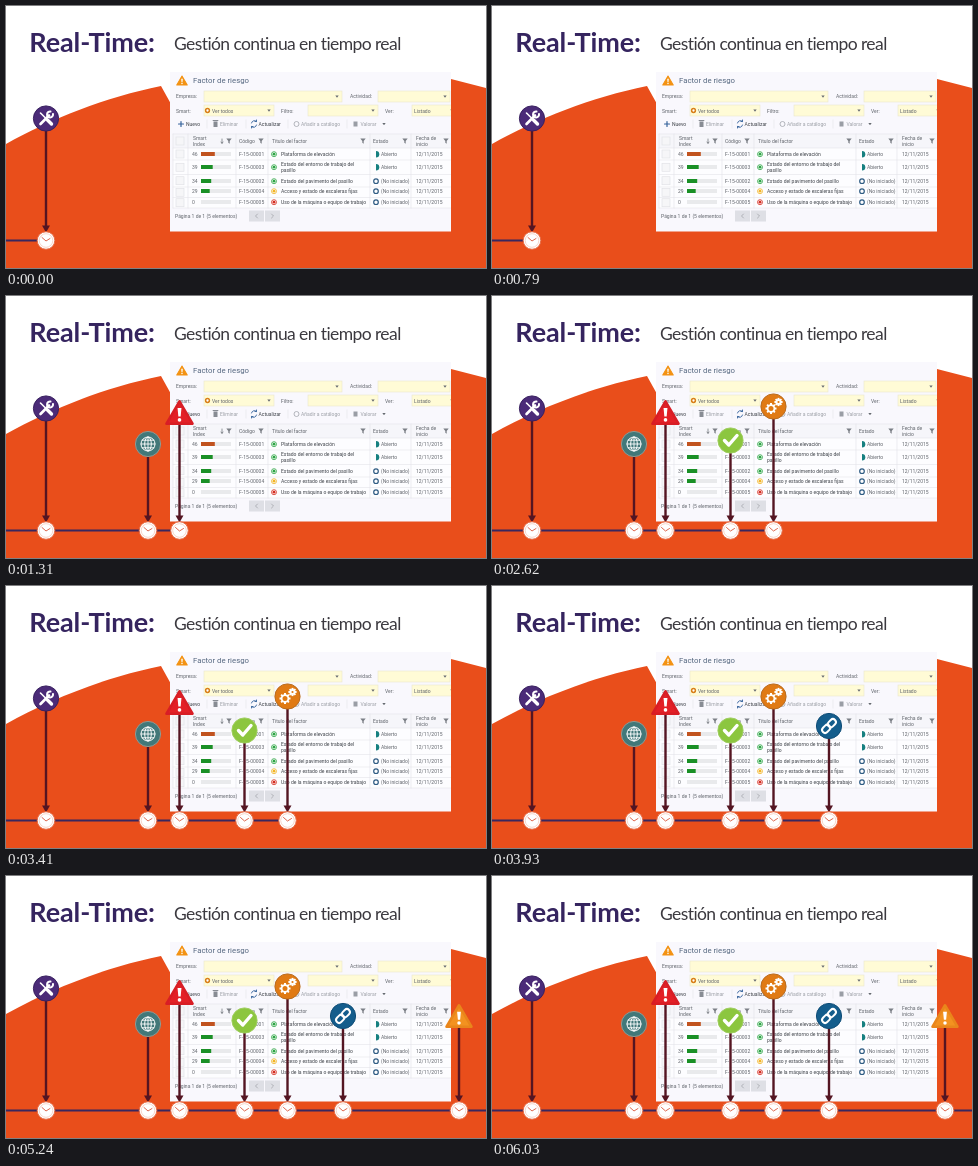
These frames come from a looping animation (480x262 px, 6.55 s). An HTML page:

```html
<!DOCTYPE html>
<html lang="es">
<head>
<meta charset="utf-8">
<title>Real-Time</title>
<style>
html, body { margin: 0; width: 100%; height: 100%; overflow: hidden; background: #fff; }
svg { display: block; width: 100vw; height: 100vh; }
text { font-family: Roboto, Arial, sans-serif; font-size: 5px; fill: #5f636a; }
.title { font: 700 27px Lato, sans-serif; letter-spacing: -.1px; fill: #35245f; }
.subtitle { font: 400 17.5px Lato, sans-serif; letter-spacing: -.59px; fill: #3b393f; }
.heading { font-size: 7.8px; fill: #566880; }
.dim { fill: #9b9ea5; }
.strong { fill: #3c4047; }
</style>
</head>
<body>
<svg id="stage" viewBox="0 0 480 262">
  <rect width="480" height="262" fill="#fff"/>
  <path fill="#e94e1b" d="M0 138C45 113 100 91 155 80L165 98H445V73L480 82V262H0Z"/>
  <text class="title" x="23.3" y="46">Real-Time:</text>
  <text class="subtitle" x="168" y="44">Gestión continua en tiempo real</text>
  <svg id="panel" x="164" y="66" width="281" height="159.5" viewBox="164 66 281 159.5"></svg>
  <line id="track" y1="234.5" y2="234.5" stroke="#38275f" stroke-width="2.2"/>
  <g id="pins"></g>
</svg>
<script>
const STEP = 1310;
const $ = id => document.getElementById(id);

const rect = (x, y, w, h, fill, extra = '') =>
  `<rect x="${x}" y="${y}" width="${w}" height="${h}" fill="${fill}" ${extra}/>`;
const circle = (x, y, r, fill, extra = '') =>
  `<circle cx="${x}" cy="${y}" r="${r}" fill="${fill}" ${extra}/>`;
const stroke = (d, color, width = 1) =>
  `<path d="${d}" fill="none" stroke="${color}" stroke-width="${width}" stroke-linecap="round" stroke-linejoin="round"/>`;
const label = (x, y, text, cls = '') => `<text x="${x}" y="${y}" class="${cls}">${text}</text>`;
const arrow = (x, y) => `<path d="M${x - 1.7} ${y - 1}h3.4l-1.7 2.2z" fill="#666a70"/>`;
const funnel = (x, y) => `<path d="M${x - 2.7} ${y - 2.5}h5.4l-2 2.6v2.6l-1.4-1v-1.6z" fill="#7b7f86"/>`;
const field = (x, y, w) => rect(x, y, w, 11, '#fffbd6', 'stroke="#e9e6cd" stroke-width=".6"') + arrow(x + w - 5, y + 5.5);
const checkbox = y => rect(170, y - 4, 8, 8, '#f6f6f8', 'stroke="#dedfe3" stroke-width=".6"');

function warning(size, color, edge = color) {
  const h = size * .86;
  return `<path d="M0 ${-h / 2}L${size / 2} ${h / 2}H${-size / 2}Z" fill="${color}" stroke="${edge}" stroke-width="${size * .1}" stroke-linejoin="round"/>` +
    `<path d="M${-size * .075} ${-h * .2}h${size * .15}l${-size * .03} ${h * .38}h${-size * .09}z" fill="#fff"/>` +
    circle(0, h * .33, size * .07, '#fff');
}

function toolbar() {
  return stroke('M172.5 118h5M175 115.5v5', '#35639b', 1.2) + label(180, 120, 'Nuevo', 'strong') +
    rect(207.5, 115.5, 4, 5.5, '#888c94') + rect(206.7, 114, 5.6, 1, '#888c94') + label(214, 120, 'Eliminar', 'dim') +
    stroke('M245.5 117a3 3 0 0 1 5-1.5M250.5 119a3 3 0 0 1-5 1.5M250.5 114v1.5h-1.5M245.5 122v-1.5h1.5', '#35639b', .9) +
    label(252.5, 120, 'Actualizar', 'strong') +
    circle(290.5, 118, 2.5, 'none', 'stroke="#a2a5ad" stroke-width=".8"') + label(295, 120, 'Añadir a catálogo', 'dim') +
    rect(347.5, 115.5, 4, 5, '#9a9da5') + label(354.5, 120, 'Valorar', 'dim') + arrow(378, 118) +
    stroke('M201 114v8M240 114v8M282 114v8M341 114v8', '#e3e4e9', .6);
}

function tableRow([y, value, code, dot, lines, open], i) {
  const tops = [142, 154, 168.5, 181, 191.5, 202];
  const offset = lines.length > 1 ? -2.7 : 0;
  const state = open
    ? '<path d="M370 ' + (y - 5) + 'a3.3 3.3 0 0 1 0 6.6z" fill="#168080"/>'
    : circle(370, y - 1.8, 2.3, 'none', 'stroke="#2f5c83" stroke-width="1.2"');
  return checkbox((tops[i] + tops[i + 1]) / 2) + label(186, y, value) +
    rect(195, y - 4, 30, 4, '#e9eaec') + rect(195, y - 4, value * .3, 4, i ? '#1a9026' : '#c1531f') +
    label(233, y, 'F-15-0000' + code) +
    circle(268, y - 1.8, 2.5, '#fff', `stroke="${dot}" stroke-width=".8"`) + circle(268, y - 1.8, 1.4, dot) +
    lines.map((line, n) => label(275, y + offset + n * 5.6, line, 'strong')).join('') +
    state + label(375, y, open ? 'Abierto' : '(No iniciado)') + label(410, y, '12/11/2015') +
    stroke(`M167 ${tops[i + 1]}H445`, '#e4e4e9', .6);
}

function drawPanel() {
  const green = '#2ca544';
  const rows = [
    [150, 46, 1, green, ['Plataforma de elevación'], true],
    [163, 39, 3, green, ['Estado del entorno de trabajo del', 'pasillo'], true],
    [177, 34, 2, green, ['Estado del pavimento del pasillo'], false],
    [187, 29, 4, '#f2b426', ['Acceso y estado de escaleras fijas'], false],
    [198, 0, 5, '#d52b20', ['Uso de la máquina o equipo de trabajo'], false]
  ];
  const headings = [[187, 134, 'Smart'], [187, 140, 'Index'], [233, 137, 'Código'],
    [266, 137, 'Título del factor'], [367, 137, 'Estado'], [410, 134, 'Fecha de'], [410, 140, 'inicio']];
  $('panel').innerHTML = rect(164, 66, 281, 160, '#f9f8fd') +
    `<g transform="translate(176 74.5)">${warning(10.5, '#f39213')}</g>` +
    label(187, 77, 'Factor de riesgo', 'heading') +
    label(170, 92, 'Empresa:') + field(198, 85, 138) + label(344, 92, 'Actividad:') + field(372, 85, 72) +
    label(170, 107, 'Smart:') + field(198, 99, 70) +
    circle(201.5, 104.5, 1.9, '#fff', 'stroke="#d9801a" stroke-width="1.5"') + label(206, 106.5, 'Ver todos') +
    label(275, 107, 'Filtro:') + field(302, 99, 70) + label(379, 107, 'Ver:') +
    field(406, 99, 45) + label(408, 106.5, 'Listado') +
    toolbar() + rect(167, 128, 278, 14, '#f6f6fa') + rect(167, 142, 278, 60, '#fdfdff') + checkbox(135) +
    headings.map(h => label(...h)).join('') +
    [223, 255, 357, 399, 440].map(x => funnel(x, 135)).join('') +
    stroke('M216 133v4M215 136l1 1.5 1-1.5', '#666a70', .7) +
    rows.map(tableRow).join('') +
    stroke('M167 128H445M167 142H445M167 128V202M182 128V202M230 128V202M262 128V202M364 128V202M405 128V202', '#e2e2e8', .6) +
    label(169, 211.5, 'Página 1 de 1 (5 elementos)') +
    rect(243, 204.5, 15, 11, '#dedfe5') + rect(259, 204.5, 15, 11, '#dedfe5') +
    stroke('M251.5 208l-2 2 2 2M265.5 208l2 2-2 2', '#a2a4aa', .8);
}

const badge = (color, mark, rim = color) => circle(0, 0, 12.6, color, `stroke="${rim}"`) + mark;

function gear(x, y, r) {
  const teeth = Array.from({ length: 8 }, (_, i) =>
    `<rect x="-1" y="${-r - 1.5}" width="2" height="2.5" fill="#fff" transform="rotate(${i * 45})"/>`).join('');
  return `<g transform="translate(${x} ${y})">${teeth}${circle(0, 0, r - .6, 'none', 'stroke="#fff" stroke-width="1.8"')}</g>`;
}

const icons = {
  tools: badge('#4b2b78', stroke('M-5.5-5.5L0 0', '#fff', 1.6) + stroke('M1.5 1.5L5.5 5.5', '#fff', 3.4) +
    stroke('M-5.5 5.5L3-3', '#fff', 2.6) + stroke('M7-4.5A3 3 0 1 1 4.5-7', '#fff', 2), '#38205f'),
  globe: badge('#427879', circle(0, 0, 7, 'none', 'stroke="#fff"') +
    '<ellipse rx="3.3" ry="7" fill="none" stroke="#fff"/>' +
    stroke('M0-7V7M-7 0H7M-5.9-3.8H5.9M-5.9 3.8H5.9', '#fff', .9), '#8f9a92'),
  alert: warning(26, '#e32027', '#d81d25'),
  check: badge('#8cc63f', stroke('M-6 0L-1.7 4.5L6.5-5', '#fff', 3.4), '#9fce60'),
  gears: badge('#e07a14', gear(-2.5, 2, 4) + gear(5, -4.5, 2.6), '#b86c20'),
  link: badge('#145d8c', '<g transform="rotate(-45)" fill="none" stroke="#fff" stroke-width="2">' +
    '<rect x="-8.5" y="-3" width="9" height="6" rx="3"/><rect x="-.5" y="-3" width="9" height="6" rx="3"/></g>', '#0f4d77'),
  caution: warning(25, '#f39220', '#e9861b')
};

// Each pin: x, icon height, icon, step on which it appears
const pins = [
  [40, 112.5, 'tools', 0], [142, 148, 'globe', 1], [173.5, 116.5, 'alert', 1],
  [238.5, 144.5, 'check', 2], [281.5, 110.5, 'gears', 2], [337, 140, 'link', 3], [453, 140, 'caution', 4]
];
const trackEnds = [40, 173.5, 281.5, 337, 480];

function pin([x, y, icon]) {
  return `<g transform="translate(${x} 0)">` +
    `<path d="M0 ${y + 12}V222" stroke="#541522" stroke-width="2.4"/>` +
    '<path d="M-4 219.5H4L0 226.5Z" fill="#541522"/>' +
    circle(0, 234.5, 8.8, '#fff', 'stroke="#e66b45" stroke-width="1"') +
    circle(0, 234.5, 6.8, 'none', 'stroke="#f0b9a4" stroke-width=".6"') +
    stroke('M-4 231.5L0 235L4 232.5', '#d9573c', .9) +
    `<g transform="translate(0 ${y})">${icons[icon]}</g></g>`;
}

drawPanel();
$('pins').innerHTML = pins.map(pin).join('');
const pinNodes = [...$('pins').children];

function render(time) {
  const step = Math.floor(time / STEP) % trackEnds.length;
  $('track').setAttribute('x2', trackEnds[step]);
  pinNodes.forEach((node, i) => node.setAttribute('visibility', pins[i][3] <= step ? 'visible' : 'hidden'));
}

const start = performance.now();
function tick() {
  render(performance.now() - start);
  requestAnimationFrame(tick);
}
render(0);
requestAnimationFrame(tick);
</script>
</body>
</html>
```
